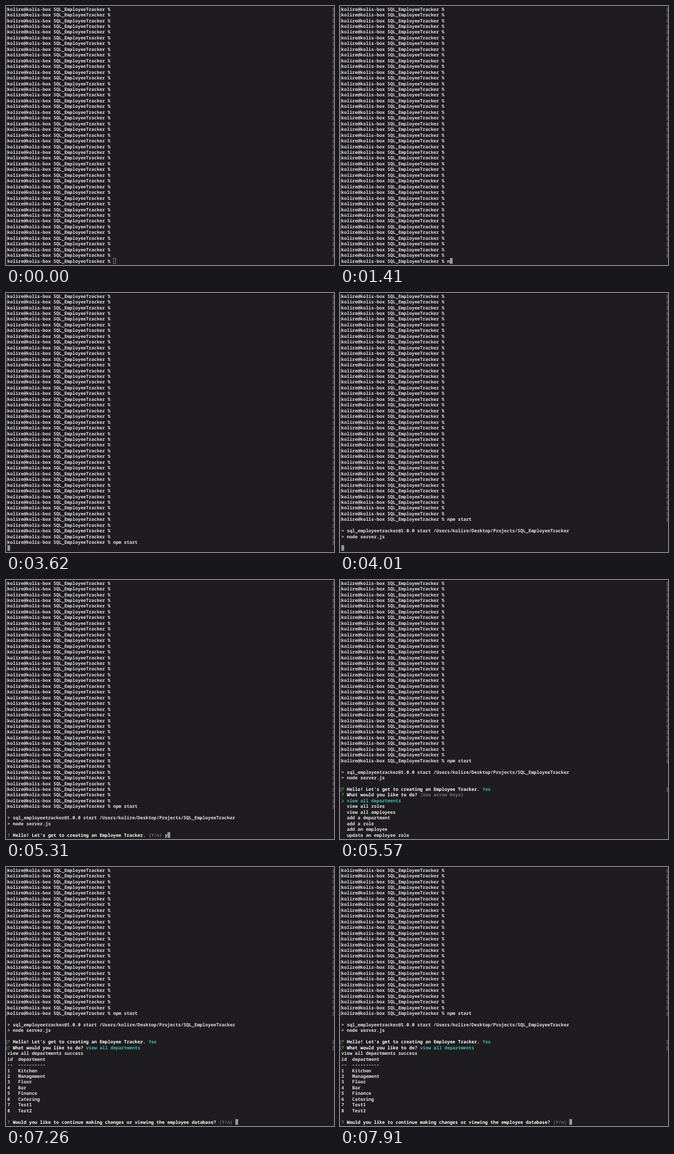
Recreate the animation shown at these times as an HTML page with a canvas. Size 600x473 px, loop 8 s.

```html
<!DOCTYPE html>
<html lang="en">
<head>
<meta charset="utf-8">
<title>Terminal session</title>
<style>
html, body { margin: 0; width: 100%; height: 100%; overflow: hidden; background: #1e1c1f; }
canvas { display: block; width: 600px; height: 473px; }
</style>
</head>
<body>
<canvas id="term"></canvas>
<script>
const W = 600, H = 473, LOOP = 8000;
const ROWS = 45, LEFT = 2.5, CELL = 4.965, PITCH = 10.455, BASE = 8.6;
const BG = '#1e1c1f', EDGE = '#0d0c0d', FG = '#e4e4e4', BRIGHT = '#ffffff', DIM = '#747274';
const GREEN = '#3fb545', CYAN = '#3cbcb2', BLOCK = '#9c9a9c', MARK = '#828082';

const canvas = document.getElementById('term');
const ctx = canvas.getContext('2d');
const dpr = window.devicePixelRatio || 1;
canvas.width = W * dpr;
canvas.height = H * dpr;
ctx.scale(dpr, dpr);

// A line is a list of runs [text, colour, bold]; marked lines get side brackets.
const run = (text, color = FG, bold = false) => [text, color, bold];
const line = (...runs) => ({ runs, mark: false });
const marked = (...runs) => ({ runs, mark: true });
const plain = text => line(run(text));

const PROMPT = 'kolire@kolis-box SQL_EmployeeTracker % ';
const COMMAND = 'npm start';
const KEY_TIMES = [1410, 1540, 1670, 1930, 2190, 2320, 2450, 2580, 2710];
const CHOICES = ['view all roles', 'view all employees', 'add a department',
  'add a role', 'add an employee', 'update an employee role'];
const DEPARTMENTS = ['Kitchen', 'Management', 'Floor', 'Bar',
  'Finance', 'Catering', 'Test1', 'Test2'];

const idle = marked(run(PROMPT));
const started = marked(run(PROMPT + COMMAND));
const banner = [
  started,
  plain(''),
  plain('> sql_employeetracker@1.0.0 start /Users/kolire/Desktop/Projects/SQL_EmployeeTracker'),
  plain('> node server.js'),
  plain('')
];

const ask = (text, ...rest) =>
  [run('? ', GREEN, true), run(text + ' ', BRIGHT, true), ...rest];
const yesNo = typed => [run('(Y/n) ', DIM), run(typed)];
const HELLO = "Hello! Let's get to creating an Employee Tracker.";
const WHAT = 'What would you like to do?';
const AGAIN = 'Would you like to continue making changes or viewing the employee database?';
const greeted = marked(...ask(HELLO, run('Yes', CYAN)));

const menu = [
  ...banner, greeted,
  line(...ask(WHAT, run('(Use arrow keys)', DIM))),
  line(run('❯ view all departments', CYAN)),
  ...CHOICES.map(c => plain('  ' + c))
];

const results = [
  ...banner, greeted,
  marked(...ask(WHAT, run('view all departments', CYAN))),
  plain('view all departments success'),
  plain('id  department'),
  plain('--  ----------'),
  ...DEPARTMENTS.map((d, i) => plain(`${i + 1}   ${d}`)),
  plain(''),
  line(...ask(AGAIN, ...yesNo('')))
];

function screenAt(t) {
  if (t < 3620) {
    const typed = KEY_TIMES.filter(k => k <= t).length;
    return {
      lines: [line(run(PROMPT + COMMAND.slice(0, typed)))],
      cursor: t < 500 ? 'hollow' : 'block'
    };
  }
  if (t < 4010) return { lines: [started, plain('')], cursor: 'block' };
  if (t < 4270) return { lines: [...banner, plain('')], cursor: 'block' };
  if (t < 5570) {
    const hello = line(...ask(HELLO, ...yesNo(t < 5310 ? '' : 'y')));
    return { lines: [...banner, hello], cursor: 'block' };
  }
  if (t < 7260) return { lines: menu, cursor: null };
  return { lines: results, cursor: 'block' };
}

function drawMark(row) {
  const y = Math.round(row * PITCH + 2.5);
  ctx.fillStyle = MARK;
  ctx.fillRect(1, y, 1, 8);
  ctx.fillRect(598, y, 1, 8);
}

function drawLine({ runs, mark }, row) {
  let col = 0;
  if (mark) drawMark(row);
  for (const [text, color, bold] of runs) {
    ctx.font = `${bold ? 800 : 600} ${CELL / 0.6}px "Noto Sans Mono", "DejaVu Sans Mono", monospace`;
    ctx.fillStyle = color;
    ctx.fillText(text, LEFT + col * CELL, BASE + row * PITCH);
    col += text.length;
  }
  return col;
}

function drawCursor(kind, col) {
  const x = LEFT + col * CELL, y = 460.5;
  if (kind === 'hollow') {
    ctx.strokeStyle = BLOCK;
    ctx.lineWidth = 0.8;
    ctx.strokeRect(x + 0.4, y + 0.2, CELL - 0.8, 9.6);
  } else {
    ctx.fillStyle = BLOCK;
    ctx.fillRect(x, y, CELL, 10.3);
  }
}

function render(t) {
  const { lines, cursor } = screenAt(t);
  const first = ROWS - lines.length;
  let col = 0;
  ctx.fillStyle = BG;
  ctx.fillRect(0, 0, W, H);
  ctx.fillStyle = EDGE;
  ctx.fillRect(0, 0, W, 1);
  ctx.textBaseline = 'alphabetic';
  ctx.textRendering = 'geometricPrecision';
  for (let row = 0; row < ROWS; row++) {
    col = drawLine(row < first ? idle : lines[row - first], row);
  }
  if (cursor) drawCursor(cursor, col);
}

const start = performance.now();
function tick() {
  render((performance.now() - start) % LOOP);
  requestAnimationFrame(tick);
}
tick();
</script>
</body>
</html>
```
